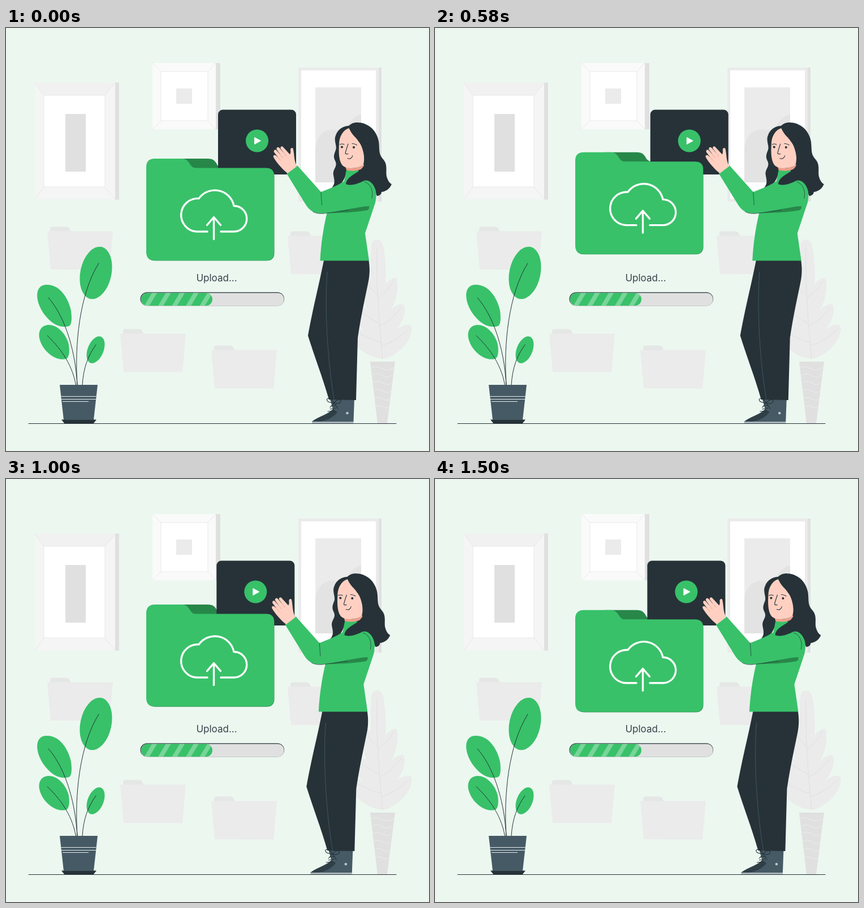
Recreate the animation shown at these times as an HTML page. Size 748 by 748 pixels, loop 1540 ms.

```html
<!DOCTYPE html>
<html lang="en">
<head>
<meta charset="utf-8">
<title>Upload</title>
<style>
  html, body { margin: 0; width: 100%; height: 100%; overflow: hidden; background: #ecf7f0; }
  svg { display: block; width: 100vw; height: 100vh; }
  .green { fill: #38c169; }
  .shade { fill: #278749; }
  .dark { fill: #263238; }
  .slate { fill: #455a64; }
  .skin { fill: #ffd0c2; }
  .g1 { fill: #f5f5f5; }
  .g2 { fill: #ebebeb; }
  .g3 { fill: #e0e0e0; }
  .white { fill: #fff; }
  .line { fill: none; stroke: #263238; stroke-linecap: round; stroke-linejoin: round; }
  .cloud { fill: none; stroke: #fff; stroke-width: 3.4; stroke-linecap: round; stroke-linejoin: round; }
  .vein { fill: none; stroke: #dedede; stroke-width: .9; }
  .bevel { fill: none; stroke: #e4e4e4; stroke-width: .8; }
  text { font: 400 17px Inter, "Open Sans", sans-serif; fill: #37444a; }
</style>
</head>
<body>
<svg viewBox="0 0 748 748">
  <defs>
    <g id="file">
      <path fill="#e5e7e6" d="M5 1V-4Q5-8 9-8H33Q38-8 40-3L42 1Z"/>
      <path class="g2" d="M0 0H116L110 68L6 67.500Z"/>
    </g>
    <path id="front" d="M248 246Q248 231 263 231H311C321 231 323 238 327 243Q330 247.500 336 247.500H460Q474 247.500 474 261V397Q474 411 460 411H263Q248 411 248 396Z"/>
    <clipPath id="fill"><rect x="239" y="468.500" width="126" height="22.500" rx="11.200"/></clipPath>
  </defs>
  <rect width="748" height="748" fill="#ecf7f0"/>

  <g id="frames">
    <path class="g3" d="M193 96.500H200V303.500H193Z"/>
    <path class="g1" d="M51 97H193V303H51Z"/>
    <path fill="#f1f1f1" d="M51 97H193L175 119H67Z"/>
    <path class="white" d="M67 119H175V281H67Z"/>
    <path class="bevel" d="M67 119H175V281H67ZM51 97L67 119M193 97L175 119M51 303L67 281M193 303L175 281"/>
    <path class="g3" d="M105 152H141V254H105Z"/>

    <path class="g3" d="M371 62H379V179H371Z"/>
    <path fill="#fafafa" d="M259 62H371V179H259Z"/>
    <path class="white" d="M274 77H357V164H274Z"/>
    <path class="bevel" d="M274 77H357V164H274ZM259 62L274 77M371 62L357 77M259 179L274 164M371 179L357 164"/>
    <path class="g2" d="M301 107H329V134H301Z"/>

    <path class="g3" d="M657 70H664V307H657Z"/>
    <path class="g2" d="M517 70H659V307H517Z"/>
    <path class="white" d="M522 75H654V302H522Z"/>
    <path class="g2" d="M547 105H628V273H547Z"/>
    <path fill="#e3e3e3" d="M547 273V214C549 193 560 180 578 180H600C606 166 615 157 628 152V273Z"/>
  </g>

  <use href="#file" x="73" y="359.500"/>
  <use href="#file" x="498" y="367.500"/>
  <use href="#file" x="202" y="540.500"/>
  <use href="#file" x="363" y="569.500"/>

  <g id="backPlant">
    <path class="g2" d="M666 585C695 581 722 546 717 528C712 520 700 527 690 533C702 521 708 500 704 490C698 485 688 492 680 499C690 485 695 460 691 444C688 438 678 445 671 453C673 430 670 400 667 385C664 371 648 370 646 384C644 400 646 425 644 447C640 440 634 436 631 440C625 455 630 480 638 497C628 490 615 488 614 495C612 510 622 525 632 535C620 528 606 522 606 532C606 555 635 583 666 585Z"/>
    <path class="vein" d="M656 388C654 460 661 530 666 585M657 478Q674 467 686 446M661 527Q684 515 699 494M665 562Q694 551 712 532M656 472Q643 461 635 444M659 522Q640 512 621 498M663 556Q638 549 614 534"/>
    <path class="g3" d="M644 590H688L674 699H657Z"/>
    <path fill="none" stroke="#ededed" d="M645 601Q654 596 664 602T687 600M647 614Q657 609 666 615T685 612M648 627Q658 622 667 628T684 626M650 641Q658 636 667 642T682 640M652 656Q659 651 667 656T680 655M653 670Q660 666 667 670T678 669"/>
  </g>

  <path class="line" d="M40 699.500H690" stroke-width="1"/>

  <g id="plant">
    <ellipse class="green" cx="159" cy="433" rx="27.500" ry="47" transform="rotate(12 159 433)"/>
    <path class="green" d="M110 527.500C116 527 117 515 115 500C111 480 97 455 74 454C58 453 53 465 56 481C60 502 84 534 110 527.500Z"/>
    <path class="green" d="M106 585C113 583 113 567 110 556C104 538 90 525 75 525C60 526 56 539 60 552C66 572 88 590 106 585Z"/>
    <ellipse class="green" cx="158.500" cy="569" rx="14" ry="25" transform="rotate(22 158.500 569)"/>
    <path class="line" d="M126 631C121 560 130 470 164 416M75 477C100 505 122 560 126 631M73 544C92 562 116 590 123.500 631M159 560C145 580 137 600 135 631" stroke-width="1"/>
    <path class="dark" d="M98 692.500H160L154 700H104Z"/>
    <path class="slate" d="M95 631H162L155 693H102Z"/>
    <path fill="none" stroke="#e7ecee" d="M97.500 651.500H159.500M98 656.500H159M100 660.500H146"/>
  </g>

  <g id="back">
    <path class="shade" d="M300 231H357C366 231 370 235 373 241C375 245 379 247.500 385 248H320Z"/>
  </g>

  <g id="card">
    <rect class="dark" x="375" y="144.500" width="138" height="114.500" rx="8.500"/>
    <circle class="green" cx="444" cy="199.500" r="20"/>
    <path fill="#fff" stroke="#fff" stroke-linejoin="round" d="M439.500 193.500V205.500L450.500 199.500Z"/>
  </g>

  <g id="folder">
    <use href="#front" class="shade" x=".5" y=".6"/>
    <use href="#front" class="green"/>
    <path class="cloud" d="M356 360H337A29 29 0 1 1 341 301.500A34.500 34.500 0 0 1 403 314.500A22.700 22.700 0 0 1 403 360H380M367.500 373.500V335M355.500 348.500L367.500 334.500L379.500 348.500"/>
  </g>

  <text x="372.500" y="448" text-anchor="middle">Upload...</text>

  <g id="bar">
    <rect class="dark" x="237.500" y="467.300" width="254.500" height="24" rx="12"/>
    <rect class="g3" x="238.600" y="468.500" width="253" height="22.700" rx="11.300"/>
    <g clip-path="url(#fill)">
      <path class="green" d="M238 467H366V492H238Z"/>
      <g id="stripes" fill="#fff" fill-opacity=".32"></g>
    </g>
  </g>

  <g id="woman">
    <path class="dark" d="M620 167C640 167 655 180 659 200C661 213 658 222 666 231C676 241 671 252 673 262C675 270 679 275 682 276C679 284 672 289 664 290C664 294 660 297 656 297L640 262L600 262C596 272 590 282 574 285C584 275 580 268 579 260C577 250 586 246 583 237C580 230 578 228 583 216C586 208 579 200 583 190C587 178 598 173 606 173C610 169 615 167 620 167Z"/>
    <path class="slate" d="M573 656H616L614.500 696H541C555 686 571 683 578 674Z"/>
    <path class="dark" d="M541 696C552 687 570 683 578 674L586 679C580 688 566 695 554 696Z" opacity=".65"/>
    <path fill="#a9b5ba" d="M541 696H614.500V699H541Z"/>
    <circle cx="603.500" cy="681" r="2.300" fill="#b9c6cc"/>
    <path class="dark" d="M562 411H641.500C643.500 424 643.500 436 640.500 450C634 482 627 513 622 548L619 658L571 657C560 618 545 580 534 544C541 503 554 452 562 411Z"/>
    <path fill="none" stroke="#455a64" stroke-width=".9" d="M568 431C563 500 569 590 580 656"/>
    <path class="line" stroke-width="1.100" d="M580 663C574 653 565 654 568 659C570 663 576 662 580 663C586 655 594 656 592 661C590 665 584 664 580 663L573 671M580 663L587 673M574 669L584 667M573 674L583 672M569 678L580 677"/>

    <path class="green" d="M602 250L598 271C585 279 570 285 557 290L515 243L496 257L528 309C536 323 545 329 562 328L567.500 327C562 350 557 380 555.500 411.500H642L635 363L653 309C658 286 652 270 632 268L622 250Z"/>
    <path class="shade" d="M566 327.500C600 322 625 316 642 315C643 319 641 322 637 322.500C615 326 592 327 566 327.500Z"/>
    <path class="line" stroke-width=".7" d="M557 290L558.500 313M543 325Q552 330 566 327.500L606 322"/>

    <path fill="#eea08c" d="M600 245C610 250 625 248 633 241V247C624 253 612 254 602 251Z"/>
    <path class="skin" d="M607 177C596 180 589 192 589 206C588 222 589 236 595 243C601 249 618 250 631 243C635 238 633 215 632 205C626 197 616 190 607 177Z"/>
    <path class="dark" d="M606 176C612 190 619 193 623 200C630 208 634 222 634 241C627 258 603 259 601 276C611 280 623 275 631 271C641 266 652 274 656 296L664 288L657 200L622 168Z"/>
    <path class="line" stroke-width=".7" d="M634 272C645 275 650 288 647 301"/>
    <circle class="dark" cx="594" cy="210.500" r="2"/>
    <circle class="dark" cx="615" cy="211" r="2"/>
    <path class="line" stroke-width="1.100" d="M590.500 206Q594 204 598 206M612 204.500Q616 204 620.500 207M605 205C603 211 601 217 600 221.500Q602 223.500 605 222.500M604 230.500C608 232.500 612 230 613 225.500"/>

    <path class="skin" d="M498 257C489 250 479 239 473 228.500C472 224.500 475 223.500 478 226L482 230L474 219.500C473 215.500 476 214 478.500 216.500L486 225L478.500 214.500C478 210.500 481.500 209.500 483.500 212L493 223L485.500 213C485 209.500 488 208 490 210.500L502 223.500C504 220 503 217 503 214.500C504 211 508 211 508 215C510 224 509 235 514.500 244.500Z"/>
    <path fill="none" stroke="#d88f7d" stroke-width=".7" d="M482 230L486 234.500M486 225L490 230M493 223L496 227"/>
  </g>
</svg>
<script>
  const LOOP = 1540, FRAMES = 37, STEP = 41.62;
  const $ = id => document.getElementById(id);
  const move = (id, x, y) => $(id).setAttribute('transform', `translate(${x.toFixed(2)} ${y.toFixed(2)})`);

  // sideways shake: [phase, offset]
  const SHAKE = [[0, 0], [.1, -1.5], [.2, 3], [.3, -6], [.4, 6], [.5, -6], [.6, 6], [.7, -6], [.8, 3], [.9, -1.5], [1, 0]];

  function shake(p) {
    const i = Math.min(9, Math.floor(p * 10));
    const [a, from] = SHAKE[i], [b, to] = SHAKE[i + 1];
    return from + (to - from) * (p - a) / (b - a);
  }

  const float = p => -15 * (1 - Math.abs(2 * p - 1));

  let stripes = '';
  for (let i = 0; i < 5; i++) {
    const x = 244 + i * 24.5;
    stripes += `<path d="M${x} 492h9l15-25h-9z"/>`;
  }
  $('stripes').innerHTML = stripes;

  function draw(t) {
    const n = Math.min(FRAMES - 1, Math.floor((t + 4) / STEP));
    const p = (n + 1) / FRAMES;
    const x = shake(p) + .4, y = float(p) + .8;
    move('back', 0, y);
    move('folder', 0, y);
    move('card', x, 0);
    move('woman', x, 0);
  }

  const start = performance.now();
  function tick() {
    draw((performance.now() - start) % LOOP);
    requestAnimationFrame(tick);
  }
  tick();
</script>
</body>
</html>
```
